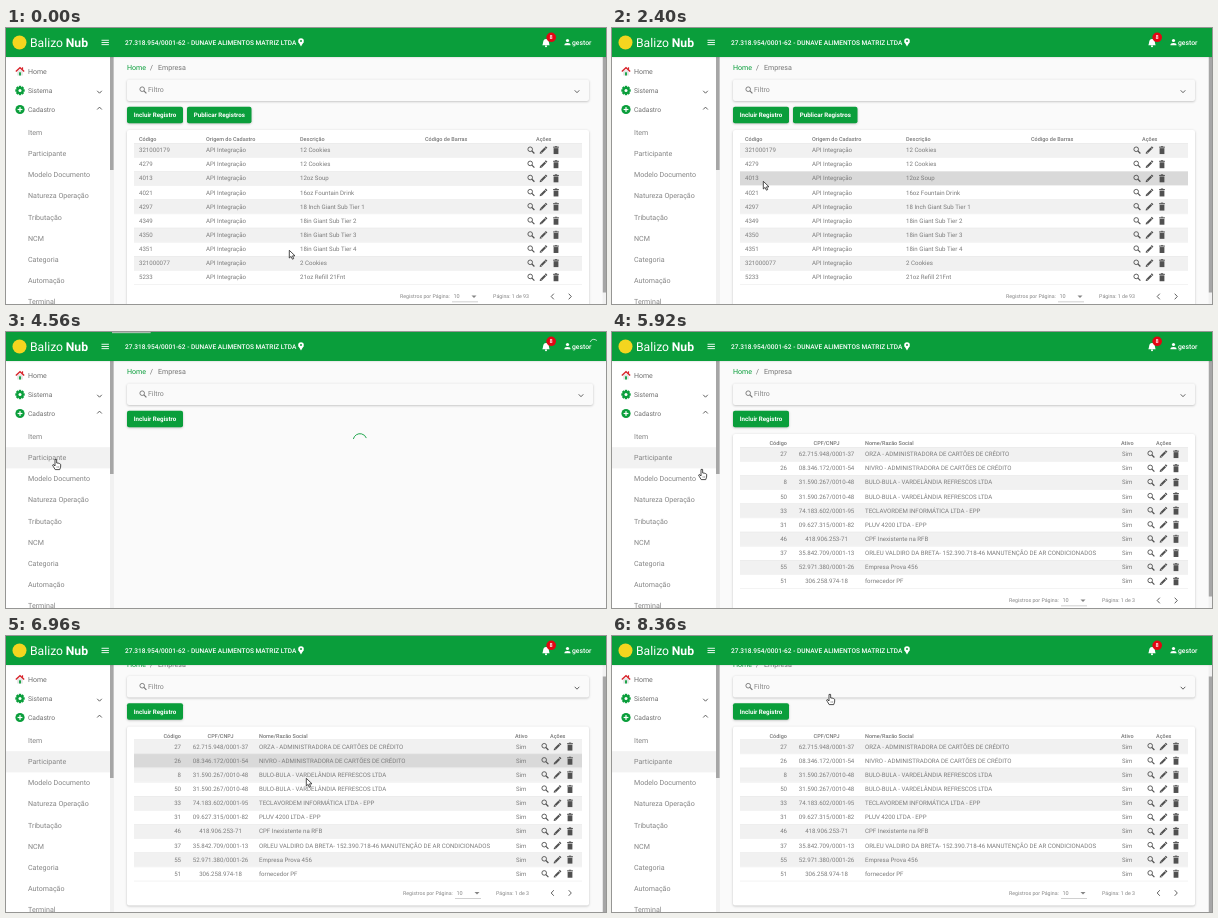
Animation, 600 px wide and 276 px high, one loop 8440 ms. Source, as an HTML page with a canvas:

```html
<!DOCTYPE html>
<html lang="pt-BR">
<head>
<meta charset="utf-8">
<title>Cadastro</title>
<style>
html, body { margin: 0; width: 100%; height: 100%; overflow: hidden; background: #fafafa; }
canvas { display: block; width: 600px; height: 276px; }
</style>
</head>
<body>
<canvas id="stage"></canvas>
<script>
const W = 600, H = 276, LOOP = 8440, TOP = 29;
const GREEN = '#0a9e3b', RED = '#d8232a', INK = '#505050', GREY = '#858585';
const THUMB = '#a6a6a6', TRACK = '#f1f1f1';
const ROW_TOP = 115, ROW_H = 14.13;
const CLEAR = 3400, LOADED = 5000, LAG = 200;

const canvas = document.getElementById('stage');
const ctx = canvas.getContext('2d');
const dpr = window.devicePixelRatio || 1;
canvas.width = W * dpr;
canvas.height = H * dpr;

const menu = ['Item', 'Participante', 'Modelo Documento', 'Natureza Operação',
  'Tributação', 'NCM', 'Categoria', 'Automação', 'Terminal'];

const items = [
  ['321000179', '12 Cookies'], ['4279', '12 Cookies'], ['4013', '12oz Soup'],
  ['4021', '16oz Fountain Drink'], ['4297', '18 Inch Giant Sub Tier 1'],
  ['4349', '18in Giant Sub Tier 2'], ['4350', '18in Giant Sub Tier 3'],
  ['4351', '18in Giant Sub Tier 4'], ['321000077', '2 Cookies'],
  ['5233', '21oz Refill 21Fnt']
];

const partners = [
  ['27', '62.715.948/0001-37', 'ORZA - ADMINISTRADORA DE CARTÕES DE CRÉDITO'],
  ['26', '08.346.172/0001-54', 'NIVRO - ADMINISTRADORA DE CARTÕES DE CRÉDITO'],
  ['8', '31.590.267/0010-48', 'BULO-BULA - VARDELÂNDIA REFRESCOS LTDA'],
  ['50', '31.590.267/0010-48', 'BULO-BULA - VARDELÂNDIA REFRESCOS LTDA'],
  ['33', '74.183.602/0001-95', 'TECLAVORDEM INFORMÁTICA LTDA - EPP'],
  ['31', '09.627.315/0001-82', 'PLUV 4200 LTDA - EPP'],
  ['46', '418.906.253-71', 'CPF Inexistente na RFB'],
  ['37', '35.842.709/0001-13', 'ORLEU VALDIRO DA BRETA- 152.390.718-46 MANUTENÇÃO DE AR CONDICIONADOS'],
  ['55', '52.971.380/0001-26', 'Empresa Prova 456'],
  ['51', '306.258.974-18', 'fornecedor PF']
];

// time, x, y of the pointer tip
const path = [
  [0, 283, 222], [840, 283, 222], [1120, 309, 229], [1319, 309, 229],
  [1320, 236, 179], [1480, 236, 179], [1520, 210, 168], [1900, 115, 140],
  [2120, 118, 142], [2320, 151, 153], [2440, 151, 153], [2640, 147, 160],
  [3120, 49, 127], [5080, 49, 127], [5900, 89, 137], [5960, 89, 137],
  [6700, 296, 128], [6960, 300, 142], [7280, 318, 205], [7680, 262, 124],
  [8300, 217, 58]
];

const clamp = v => Math.max(0, Math.min(1, v));
const ease = v => { v = clamp(v); return v * v * (3 - 2 * v); };
const isLoading = t => t >= CLEAR && t < LOADED;

function pointerAt(t) {
  let i = 0;
  while (i < path.length - 2 && t >= path[i + 1][0]) i++;
  const [t0, x0, y0] = path[i], [t1, x1, y1] = path[i + 1];
  const k = ease((t - t0) / (t1 - t0));
  return [x0 + (x1 - x0) * k, y0 + (y1 - y0) * k];
}

function text(s, x, y, size, color, weight = 400, align = 'left') {
  ctx.font = `${weight} ${size}px Roboto, sans-serif`;
  ctx.textAlign = align;
  ctx.fillStyle = color;
  ctx.fillText(s, x, y + size * 0.35);
}

function rect(x, y, w, h, color) {
  ctx.fillStyle = color;
  ctx.fillRect(x, y, w, h);
}

function disc(x, y, r, color) {
  ctx.fillStyle = color;
  ctx.beginPath();
  ctx.arc(x, y, r, 0, 7);
  ctx.fill();
}

function line(points, color, width = 1) {
  ctx.strokeStyle = color;
  ctx.lineWidth = width;
  ctx.beginPath();
  points.forEach(([x, y]) => ctx.lineTo(x, y));
  ctx.stroke();
}

function poly(points, color) {
  ctx.fillStyle = color;
  ctx.beginPath();
  points.forEach(([x, y]) => ctx.lineTo(x, y));
  ctx.closePath();
  ctx.fill();
}

function arc(x, y, r, from, to, color, width) {
  ctx.strokeStyle = color;
  ctx.lineWidth = width;
  ctx.beginPath();
  ctx.arc(x, y, r, from, to);
  ctx.stroke();
}

function panel(x, y, w, h, color, radius = 2) {
  ctx.save();
  ctx.shadowColor = 'rgba(0,0,0,.24)';
  ctx.shadowBlur = 2.4 * dpr;
  ctx.shadowOffsetY = 0.7 * dpr;
  ctx.fillStyle = color;
  ctx.beginPath();
  ctx.roundRect(x, y, w, h, radius);
  ctx.fill();
  ctx.restore();
}

const chevronV = (x, y, d) =>
  line([[x - 2.3, y - 1.2 * d], [x, y + 1.2 * d], [x + 2.3, y - 1.2 * d]], INK, 0.9);
const chevronH = (x, y, d) =>
  line([[x - 1.3 * d, y - 2.8], [x + 1.3 * d, y], [x - 1.3 * d, y + 2.8]], INK, 0.9);

function lens(x, y, color) {
  arc(x - 0.8, y - 0.8, 2.3, 0, 7, color, 0.9);
  line([[x + 0.9, y + 0.9], [x + 3.4, y + 3.4]], color, 1.2);
}

function pencil(x, y) {
  line([[x - 2.2, y + 2.2], [x + 1.8, y - 1.8]], INK, 2.1);
  line([[x + 2.1, y - 2.1], [x + 3.1, y - 3.1]], INK, 2.2);
  poly([[x - 3.8, y + 3.8], [x - 3.4, y + 1.4], [x - 1.4, y + 3.4]], INK);
}

function trash(x, y) {
  rect(x - 2.9, y - 3.4, 5.8, 1, INK);
  rect(x - 1.2, y - 4, 2.4, 0.8, INK);
  rect(x - 2.4, y - 1.9, 4.8, 5.9, INK);
}

function button(label, x, w) {
  panel(x, 78.7, w, 16.6, GREEN);
  text(label, x + w / 2, 87, 6.2, '#fff', 700, 'center');
}

function pager(x, pages) {
  text('Registros por Página:', x, 268.5, 5.25, GREY);
  text('10', x + 53.5, 268.5, 5.5, GREY);
  poly([[x + 71.5, 267.5], [x + 76.5, 267.5], [x + 74, 270]], GREY);
  rect(x + 52, 273.6, 26, 0.6, '#b0b0b0');
  text('Página: 1 de ' + pages, 523, 268.5, 5.25, GREY, 400, 'right');
  chevronH(546.5, 268.5, -1);
  chevronH(564, 268.5, 1);
}

function table(isItems, hover) {
  panel(121, 102, 462, 179, '#fff');
  const head = (s, x, align) => text(s, x, 111.5, 5.5, '#777', 500, align);
  if (isItems) {
    head('Código', 133);
    head('Origem do Cadastro', 200);
    head('Descrição', 294);
    head('Código de Barras', 419);
    head('Ações', 530);
  } else {
    head('Código', 175, 'right');
    head('CPF/CNPJ', 214.5, 'center');
    head('Nome/Razão Social', 253);
    head('Ativo', 509);
    head('Ações', 544);
  }
  const rows = isItems ? items : partners;
  rows.forEach((row, i) => {
    const top = ROW_TOP + i * ROW_H, y = top + ROW_H / 2;
    const fill = i === hover ? '#d9d9d9' : i % 2 ? '#fff' : '#f1f1f1';
    rect(128, top, 448, ROW_H, fill);
    rect(128, top, 448, 0.5, '#e6e6e6');
    const cell = (s, x, align) => text(s, x, y, 6.12, '#7c7c7c', 400, align);
    if (isItems) {
      cell(row[0], 133);
      cell('API Integração', 200);
      cell(row[1], 294);
    } else {
      cell(row[0], 175, 'right');
      cell(row[1], 214.5, 'center');
      cell(row[2], 253);
      cell('Sim', 510);
    }
    const x = isItems ? 525 : 539;
    lens(x, y, INK);
    pencil(x + 12.5, y);
    trash(x + 25, y);
  });
  rect(128, ROW_TOP + 10 * ROW_H, 448, 0.5, '#e6e6e6');
  if (isItems) pager(394, 93);
  else pager(397, 3);
}

function content(t, scroll, hover) {
  const isItems = t < CLEAR;
  // the page is wider while it needs no scrollbar
  const right = isLoading(t) ? 587 : 583;
  ctx.save();
  ctx.translate(0, -scroll);
  text('Home', 121, 40, 7.1, GREEN);
  text('/', 144, 40, 7.1, '#666');
  text('Empresa', 152, 40, 7.1, '#757575');
  panel(121, 51.5, right - 121, 21.5, '#fafafa');
  lens(137, 62, '#757575');
  text('Filtro', 142, 62, 7, GREY);
  chevronV(right - 12, 63.5, 1);
  button('Incluir Registro', 121, 56);
  if (isItems) button('Publicar Registros', 181, 64.5);
  if (!isLoading(t)) table(isItems, hover);
  ctx.restore();
}

function scrollbar(scroll) {
  rect(596.5, TOP, 3.5, H - TOP, TRACK);
  rect(596.8, TOP + scroll, 3.2, H - TOP - 11.5, THUMB);
}

function gear(x, y) {
  ctx.save();
  ctx.translate(x, y);
  for (let i = 0; i < 4; i++) {
    rect(-1.2, -4.7, 2.4, 9.4, GREEN);
    ctx.rotate(Math.PI / 4);
  }
  ctx.restore();
  disc(x, y, 3.6, GREEN);
  disc(x, y, 1.5, '#fff');
}

function house(x, y) {
  rect(x - 2.8, y - 1, 5.6, 5.2, '#e4e4e4');
  rect(x - 0.9, y + 1, 1.8, 3.2, GREEN);
  rect(x + 1.9, y - 4, 1.2, 2.4, RED);
  line([[x - 4.2, y + 0.3], [x, y - 3.6], [x + 4.2, y + 0.3]], RED, 1.3);
}

function sidebar(t) {
  rect(0, TOP, 104, H - TOP, '#fff');
  rect(104, TOP, 4, H - TOP, TRACK);
  rect(104, TOP, 3.6, 113, THUMB);
  if (t >= 3320) rect(0, 115.2, 104, 21.2, '#f2f2f2');

  house(14, 43.3);
  gear(14, 62.5);
  disc(14, 81.5, 4.6, GREEN);
  rect(11.6, 80.9, 4.8, 1.2, '#fff');
  rect(13.4, 79.1, 1.2, 4.8, '#fff');

  text('Home', 22, 43.5, 7, '#707070');
  text('Sistema', 22, 62.5, 6.7, '#707070');
  text('Cadastro', 22, 81.5, 6.7, '#707070');
  chevronV(93.5, 64, 1);
  chevronV(93.5, 80.3, -1);
  menu.forEach((s, i) => text(s, 22, 104.4 + i * 21.2, 7.1, GREY));
}

function header() {
  ctx.save();
  ctx.shadowColor = 'rgba(0,0,0,.2)';
  ctx.shadowBlur = 2 * dpr;
  rect(0, 0, W, TOP, GREEN);
  ctx.restore();

  disc(13.5, 14.5, 7, '#f4d51f');
  text('Balizo', 24, 14.5, 12.2, '#fff');
  text('Nub', 82, 14.5, 12.2, '#fff', 700, 'right');
  for (let i = 0; i < 3; i++) rect(95.5, 11.8 + i * 2.2, 7.4, 0.9, '#fff');
  text('27.318.954/0001-62 - DUNAVE ALIMENTOS MATRIZ LTDA', 119, 14.5, 6.55, '#fff', 500);

  disc(295, 13, 2.8, '#fff');
  poly([[292.4, 14], [297.6, 14], [295, 18.4]], '#fff');
  disc(295, 13, 1, GREEN);

  disc(540, 13.5, 2.6, '#fff');
  poly([[537.4, 13.5], [542.6, 13.5], [543.6, 17.2], [536.4, 17.2]], '#fff');
  disc(540, 18.2, 1, '#fff');
  disc(545.2, 9.3, 4.8, '#e30613');
  text('8', 545.2, 9.3, 5.6, '#fff', 500, 'center');

  disc(561.5, 12.5, 1.6, '#fff');
  ctx.beginPath();
  ctx.ellipse(561.5, 17.3, 3.1, 2.3, 0, Math.PI, 0);
  ctx.fill();
  text('gestor', 566, 14.5, 6.8, '#fff', 500);
}

function loading(t) {
  if (t < CLEAR || t > 5320) return;
  const turn = (t - 4560) / 1400 * 2 * Math.PI - Math.PI / 2;
  if (t < LOADED) arc(354, 108.5, 6.8, turn - 1.35, turn + 1.2, GREEN, 0.9);
  arc(588, 11.5, 4, turn - 1.2, turn + 0.8, 'rgba(255,255,255,.85)', 0.9);
  const done = ease((t - LOADED) / 200);
  const end = 106 + Math.min(t - CLEAR, LOADED - CLEAR) / 30;
  ctx.globalAlpha = 1 - clamp((t - 5200) / 120);
  rect(106, 0, end + (W - end) * done - 106, 1.2, '#a9bdae');
  ctx.globalAlpha = 1;
}

function outlined(points, width) {
  poly(points, '#fff');
  ctx.strokeStyle = '#222';
  ctx.lineWidth = width;
  ctx.stroke();
}

function pointer(x, y, isHand) {
  ctx.save();
  ctx.translate(x, y);
  ctx.lineJoin = 'round';
  if (isHand) {
    outlined([[0, 0.4], [1.6, 0.4], [1.7, 4], [3.2, 4.1], [4.6, 4.6], [5.7, 5.4],
      [5.6, 8.2], [4.7, 10.6], [0.2, 10.6], [-1.6, 7.6], [-2.4, 6], [-1.4, 5.5], [0, 7]], 0.8);
    line([[2.1, 7], [2.1, 9]], '#555', 0.4);
    line([[3.7, 7], [3.7, 9]], '#555', 0.4);
  } else {
    outlined([[0.3, 0.3], [0.3, 8], [2.1, 6.4], [3.4, 9.2], [4.7, 8.6], [3.5, 5.9], [6, 5.8]], 0.8);
  }
  ctx.restore();
}

function hoverRow(t, scroll) {
  if (t < 1480 || isLoading(t)) return -1;
  const [x, y] = pointerAt(Math.max(t - LAG, 1320));
  if (x < 128 || x > 576) return -1;
  return Math.floor((y + scroll - ROW_TOP) / ROW_H);
}

function draw(t) {
  const scroll = 11.5 * ease((t - 6640) / 260);
  ctx.setTransform(dpr, 0, 0, dpr, 0, 0);
  ctx.textRendering = 'geometricPrecision';
  rect(0, 0, W, H, '#fafafa');
  content(t, scroll, hoverRow(t, scroll));
  if (!isLoading(t)) scrollbar(scroll);
  sidebar(t);
  header();
  loading(t);
  const [x, y] = pointerAt(t);
  const onFilter = t > LOADED && x > 121 && y > 51.5 - scroll && y < 73 - scroll;
  pointer(x, y, x < 104 || onFilter);
}

const start = performance.now();
function tick() {
  draw((performance.now() - start) % LOOP);
  requestAnimationFrame(tick);
}
tick();
</script>
</body>
</html>
```
